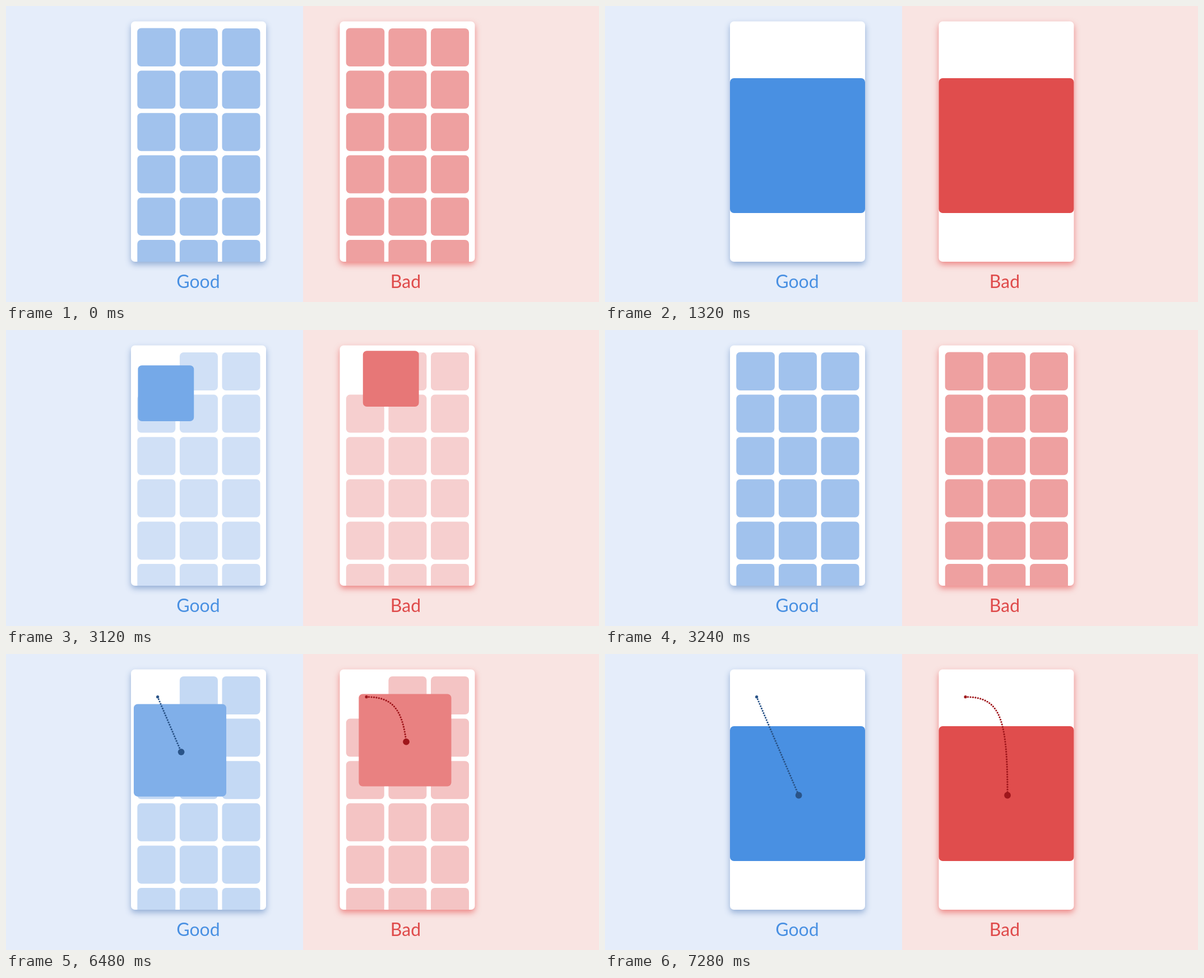
Recreate the animation shown at these times as an HTML page with a canvas. Size 1058x529 px, loop 8 s.

```html
<!DOCTYPE html>
<html lang="en">
<head>
<meta charset="utf-8">
<title>Good and bad transitions</title>
<style>
  html, body { margin: 0; width: 100%; height: 100%; overflow: hidden; }
  body { position: relative; background: #e5edfa; }
  canvas { display: block; }
  .label {
    position: absolute; top: 472px; width: 240px; text-align: center;
    font: 400 32px/40px Lato, "Open Sans", sans-serif;
  }
  #good { left: 223px; color: #4990e2; }
  #bad { left: 593px; color: #df4b4b; }
</style>
</head>
<body>
<canvas id="stage" width="1058" height="529"></canvas>
<div class="label" id="good">Good</div>
<div class="label" id="bad">Bad</div>
<script>
const ctx = document.getElementById('stage').getContext('2d');
const LOOP = 8000, STEP = 40;
const CARD = { x: 223, y: 27.5, w: 241, h: 429.5, r: 7 };
const FROM = { x: 268.5, y: 73.7, size: 68.6 };
const TO = { x: 343.5, y: 249.5, size: 241 };
const GAP = 4.5;

const clamp = v => Math.min(1, Math.max(0, v));
const lerp = (a, b, k) => a + (b - a) * k;
const span = (t, a, b) => clamp((t - a) / (b - a));
const rgb = c => `rgb(${c.map(Math.round).join()})`;

// Timing curve from (0,0) to (1,1) with handles (x1,0) and (x2,1)
function ease(x1, x2) {
  return t => {
    if (t <= 0 || t >= 1) return clamp(t);
    let lo = 0, hi = 1;
    for (let i = 0; i < 30; i++) {
      const s = (lo + hi) / 2, r = 1 - s;
      if (3 * x1 * s * r * r + 3 * x2 * s * s * r + s * s * s < t) lo = s;
      else hi = s;
    }
    return lo * lo * (3 - 2 * lo);
  };
}
const standard = ease(0.4, 0.2);
const shrink = ease(0.167, 0.2);

// Path walked at even speed: returns its length and the point at a share of it
function makePath(curve) {
  const n = 300, pts = [], dist = [0];
  for (let i = 0; i <= n; i++) {
    const [u, v] = curve(i / n);
    pts.push([lerp(FROM.x, TO.x, u), lerp(FROM.y, TO.y, v)]);
    if (i) dist.push(dist[i - 1] + Math.hypot(pts[i][0] - pts[i - 1][0], pts[i][1] - pts[i - 1][1]));
  }
  const length = dist[n];
  const at = p => {
    const d = clamp(p) * length;
    let i = 1;
    while (i < n && dist[i] < d) i++;
    const k = (d - dist[i - 1]) / (dist[i] - dist[i - 1]);
    return [lerp(pts[i - 1][0], pts[i][0], k), lerp(pts[i - 1][1], pts[i][1], k)];
  };
  return { length, at };
}

const straight = makePath(s => [s, s]);
const curved = makePath(s => {
  const r = 1 - s;
  return [2.45 * s * r * r + 3 * s * s * r + s * s * s, 0.6 * s * s * r + s * s * s];
});

const panels = [
  { dx: 0, path: straight, tile: [161, 194, 237], full: [73, 144, 226],
    dot: '#2a5488', shadow: 'rgba(50,100,170,0.45)' },
  { dx: 372.5, path: curved, tile: [238, 160, 160], full: [224, 77, 77],
    dot: '#9f161b', shadow: 'rgba(228,60,60,0.55)' }
];

function box(x, y, w, h, r, color) {
  ctx.fillStyle = color;
  ctx.beginPath();
  ctx.roundRect(x, y, w, h, r);
  ctx.fill();
}

function disc(x, y, r, color) {
  ctx.fillStyle = color;
  ctx.beginPath();
  ctx.arc(x, y, r, 0, Math.PI * 2);
  ctx.fill();
}

// move and grow are eased shares; fade is linear
function stateAt(t) {
  if (t < 3000) {
    const k = span(t, 1000, 1320), p = standard(k);
    return { move: p, grow: p, fade: k };
  }
  if (t < 6000) {
    const k = span(t, 3000, 3240);
    return { move: 1 - standard(k), grow: 1 - shrink(k), fade: 1 - k };
  }
  const k = span(t, 6000, 7280), p = standard(k);
  return { move: p, grow: p, fade: k };
}

function drawTrail(panel, move, alpha) {
  const { path, dot } = panel;
  const mark = (p, r) => {
    const [x, y] = path.at(p);
    disc(x + 2.1, y + 3, r, dot);
  };
  ctx.globalAlpha = alpha;
  for (let d = GAP; d < move * path.length; d += GAP) mark(d / path.length, 1.6);
  mark(0, 2.6);
  mark(move, 5.9);
  ctx.globalAlpha = 1;
}

function drawPanel(panel, t) {
  const { move, grow, fade } = stateAt(t);
  ctx.save();
  ctx.translate(panel.dx, 0);

  ctx.save();
  ctx.shadowColor = panel.shadow;
  ctx.shadowBlur = 11;
  ctx.shadowOffsetY = 5;
  box(CARD.x, CARD.y, CARD.w, CARD.h, CARD.r, '#fff');
  ctx.restore();

  ctx.save();
  ctx.beginPath();
  ctx.roundRect(CARD.x, CARD.y, CARD.w, CARD.h, CARD.r);
  ctx.clip();
  ctx.globalAlpha = 1 - fade;
  for (let i = 1; i < 18; i++) {
    const col = i % 3, row = Math.floor(i / 3);
    box(234.3 + col * 75.6, 40 + row * 75.6, 68, 68, 7, rgb(panel.tile));
  }
  ctx.restore();

  const [x, y] = panel.path.at(move);
  const size = lerp(FROM.size, TO.size, grow);
  const color = panel.tile.map((c, i) => lerp(c, panel.full[i], fade));
  box(x - size / 2, y - size / 2, size, size, 7, rgb(color));

  const alpha = span(t, 5840, 6000);
  if (alpha > 0) drawTrail(panel, move, alpha);
  ctx.restore();
}

function draw(t) {
  ctx.fillStyle = '#e5edfa';
  ctx.fillRect(0, 0, 530, 529);
  ctx.fillStyle = '#f9e4e2';
  ctx.fillRect(530, 0, 528, 529);
  for (const panel of panels) drawPanel(panel, t);
}

const start = performance.now();
function tick() {
  const t = (performance.now() - start) % LOOP;
  draw(Math.floor(t / STEP) * STEP);
  requestAnimationFrame(tick);
}
tick();
</script>
</body>
</html>
```
